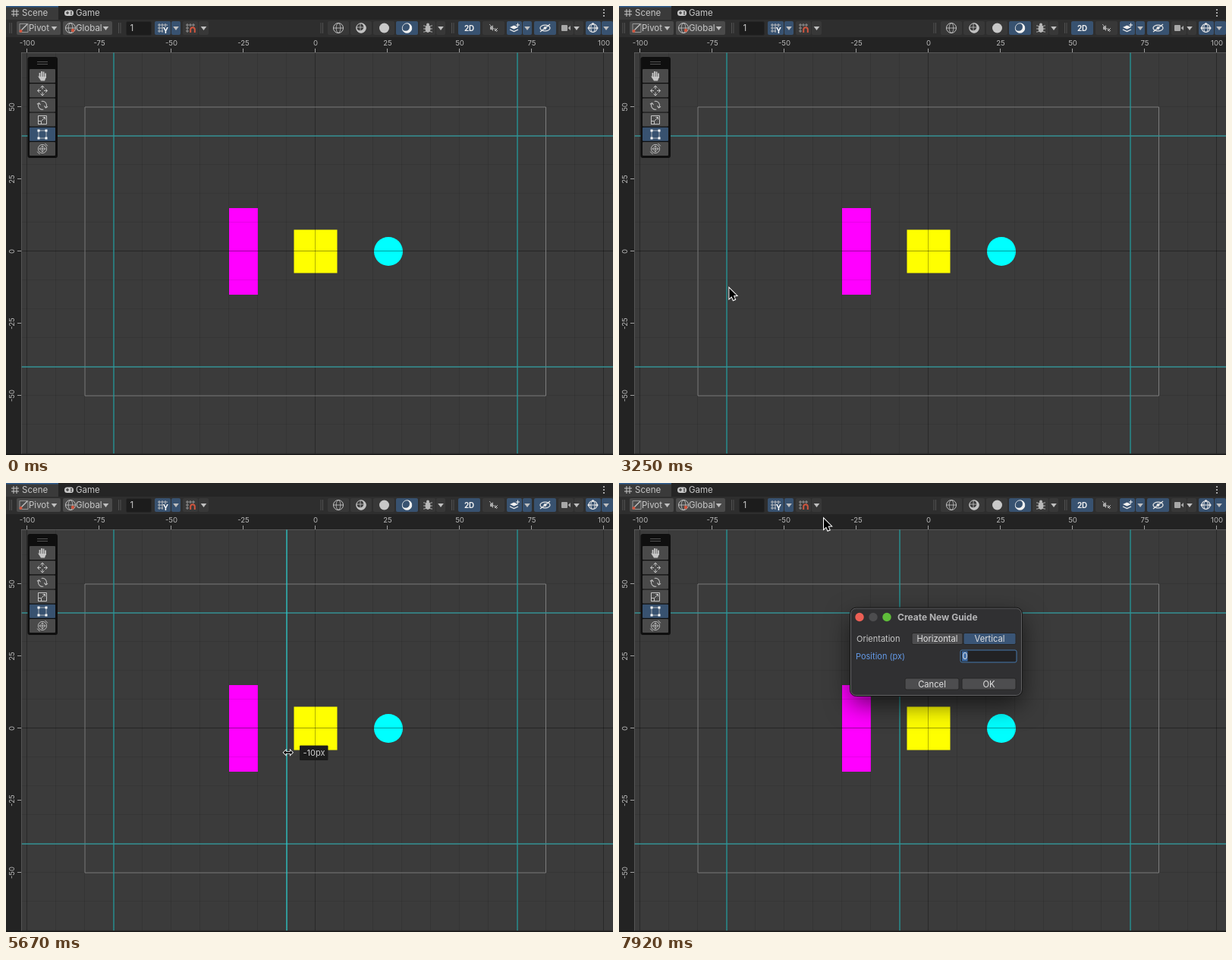
Write an HTML page with a canvas that moves like this. It is 800 by 591 pixels and loops after 8 s.

```html
<!DOCTYPE html>
<html lang="en">
<head>
<meta charset="utf-8">
<title>Scene guides</title>
<style>
html, body { margin: 0; width: 100%; height: 100%; overflow: hidden; background: #232323; }
canvas { display: block; width: 800px; height: 591px; }
</style>
</head>
<body>
<canvas id="stage" width="800" height="591"></canvas>
<script>
const c = document.getElementById('stage').getContext('2d');
const LOOP = 8000, FPS = 12, UNIT = 3.8, OX = 408, OY = 323;
const ICON = '#c6c6c6', BLUE = '#385270', GRAY = '#4a4a4a', DARK = '#383838';
const px = u => OX + u * UNIT, py = u => OY - u * UNIT;
const crisp = v => Math.floor(v - .5) + .5;

function box(x, y, w, h, fill, r = 0, stroke) {
  c.beginPath();
  c.roundRect(x, y, w, h, r);
  if (fill) { c.fillStyle = fill; c.fill(); }
  if (stroke) { c.strokeStyle = stroke; c.lineWidth = 1; c.stroke(); }
}
function line(points, color = ICON, width = 1, close = false) {
  c.beginPath();
  for (let i = 0; i < points.length; i += 2) c.lineTo(points[i], points[i + 1]);
  if (close) c.closePath();
  c.strokeStyle = color; c.lineWidth = width; c.stroke();
}
function poly(points, fill = ICON) {
  c.beginPath();
  for (let i = 0; i < points.length; i += 2) c.lineTo(points[i], points[i + 1]);
  c.closePath(); c.fillStyle = fill; c.fill();
}
function oval(x, y, rx, ry, fill, stroke, width = 1) {
  c.beginPath(); c.ellipse(x, y, rx, ry, 0, 0, Math.PI * 2);
  if (fill) { c.fillStyle = fill; c.fill(); }
  if (stroke) { c.strokeStyle = stroke; c.lineWidth = width; c.stroke(); }
}
const dot = (x, y, r, fill) => oval(x, y, r, r, fill);
const ring = (x, y, r, color = ICON, width = 1) => oval(x, y, r, r, null, color, width);
function arc(x, y, r, from, to, color = ICON, width = 1) {
  c.beginPath(); c.arc(x, y, r, from, to);
  c.strokeStyle = color; c.lineWidth = width; c.stroke();
}
function text(s, x, y, size = 11.5, color = '#c8c8c8', align = 'left', weight = 400) {
  c.font = `${weight} ${size}px Inter, sans-serif`;
  c.textAlign = align; c.fillStyle = color; c.fillText(s, x, y);
}
const caret = x => poly([x - 3.8, 27, x + 3.8, 27, x, 32], '#c0c0c0');
function at(x, y, draw, angle = 0) {
  c.save(); c.translate(x, y); c.rotate(angle); draw(); c.restore();
}
function fourWays(x, y, draw) {
  for (let i = 0; i < 4; i++) at(x, y, draw, i * Math.PI / 2);
}
function globe(x, y) {
  ring(x, y, 6.5);
  oval(x, y, 2.8, 6.5, null, ICON, .8);
  line([x - 6.5, y, x + 6.5, y], ICON, .8);
}
function grip(x) {
  for (const gx of [x, x + 2.5]) line([gx, 22, gx, 36], '#505050');
}

function guide(u, active = false) {
  line([px(u), 61, px(u), 589], active ? '#2fc4c4' : '#289496', 1.4);
}
function drawScene() {
  box(20, 61, 780, 529, '#3b3b3b');
  c.save();
  c.beginPath(); c.rect(20.5, 61, 780, 528); c.clip();
  box(px(-30), py(15), 38, 114, '#ff00ff');
  box(px(-7.5), py(7.5), 57, 57, '#ffff00');
  dot(504, OY, 19, '#00ffff');
  for (let u = -100; u <= 100; u += 10) {
    const shade = u % 100 ? 'rgba(0,0,0,.09)' : 'rgba(0,0,0,.3)';
    const x = crisp(px(u)), y = crisp(py(u));
    line([x, 61, x, 590], shade);
    line([20, y, 800, y], u ? shade : 'rgba(0,0,0,.38)');
  }
  box(104, 133, 607.5, 380, null, 0, '#7d7d7d');
  for (const u of [-70, 70]) guide(u);
  for (const u of [40, -40]) line([20, py(u), 800, py(u)], '#349294', 1.4);
  c.restore();
}

function drawRulers() {
  box(0, 41, 800, 20, '#232323');
  box(0, 41, 20, 550, '#232323');
  line([20, 61.5, 800, 61.5], '#6a6a6a', .6);
  line([20.5, 61, 20.5, 590], '#6a6a6a', .6);
  box(0, 589.5, 800, 1.5, '#181818');
  for (let u = -100; u <= 100; u += 25) {
    const x = px(u), y = py(u);
    text(u, x, 52.3, 9.6, '#b8b8b8', 'center');
    line([crisp(x), 56, crisp(x), 61], '#a0a0a0');
    if (Math.abs(u) > 50) continue;
    at(11.3, y, () => text(u, 0, 0, 9.6, '#b8b8b8', 'center'), -Math.PI / 2);
    line([15, crisp(y), 20, crisp(y)], '#a0a0a0');
  }
}

function drawTabs() {
  box(0, 0, 800, 18, '#252525');
  box(0, 0, 69, 18, '#3a3a3a');
  box(0, 0, 69, 1.5, '#2f5d8f');
  for (const d of [-2, 2]) {
    line([12 + d, 4, 12 + d, 14]);
    line([7, 9 + d, 17, 9 + d]);
  }
  text('Scene', 21, 13.2);
  box(77, 5.5, 12, 7.5, ICON, 3.5);
  line([79, 9, 83, 9], '#252525'); line([81, 7, 81, 11], '#252525');
  dot(86, 8, .9, '#252525'); dot(86, 10.5, .9, '#252525');
  text('Game', 92, 13.2);
  for (const y of [5, 9, 13]) dot(788, y, 1.1, ICON);
}

function drawToolbar() {
  box(0, 18, 800, 23, '#2e2e2e');
  [5, 148.5, 415, 587.5].forEach(grip);
  const buttons = [
    [14, 58, GRAY], [75, 65, GRAY], [196, 21, BLUE], [218, 12, BLUE],
    [233, 20, DARK], [254, 13, DARK], [424, 28, DARK], [454, 28, DARK],
    [484, 28, DARK], [514, 29, BLUE], [545, 21, DARK], [567, 12, DARK],
    [596, 29, BLUE], [628, 29, DARK], [660, 20, BLUE], [681, 12, BLUE],
    [696, 29, BLUE], [728, 20, DARK], [749, 12, DARK], [764, 20, BLUE], [785, 15, BLUE]
  ];
  for (const [x, w, fill] of buttons) box(x, 20, w, 18, fill, 2);
  [63.5, 131.5, 224, 260.5, 573, 687, 752, 791].forEach(caret);

  box(18, 23.5, 11, 11, null, 0, '#989898');
  line([19, 33, 28, 24], ICON, 1.2);
  dot(19.5, 33, 2, '#d0563f');
  text('Pivot', 30, 33.2);
  globe(85, 29); dot(88, 32, 2.2, '#d0563f');
  text('Global', 92, 33.2);
  box(158.5, 20.5, 33, 18, '#1c1c1c', 2, '#262626');
  text('1', 163.5, 33.2);

  for (const d of [0, 4, 8]) {
    line([200, 25 + d, 213, 25 + d], ICON, .9);
    line([202 + d, 23, 202 + d, 35], ICON, .9);
  }
  box(207, 28, 7, 9, BLUE);
  text('Y', 210.5, 36, 10, '#fff', 'center', 700);
  for (const d of [0, 4, 8]) {
    line([237, 25 + d, 249, 25 + d], '#9a9a9a', .9);
    line([239 + d, 23, 239 + d, 35], '#9a9a9a', .9);
  }
  box(241, 27, 10, 9, DARK);
  arc(246, 31, 2.8, Math.PI, 0, '#d0563f', 2);
  for (const x of [243.2, 248.8]) line([x, 31, x, 35], '#d0563f', 2);

  globe(438, 29);
  dot(468, 29, 6.5, '#c0c0c0'); dot(466.7, 27.7, 4.6, DARK);
  ring(468, 29, 6.2);
  line([462, 28, 471, 28], ICON, .8); line([467, 23, 467, 32], ICON, .8);
  dot(498.5, 29, 6.5, '#c8c8c8');
  dot(528.5, 29, 6.6, '#f0f0f0'); dot(526.7, 27.5, 5.3, BLUE);
  ring(528.5, 29, 6.2, '#f0f0f0', .8);
  oval(556, 30, 3.5, 5, '#b8b8b8'); dot(556, 24.5, 2, '#b8b8b8');
  for (const d of [-3, 0, 3]) line([550, 30 + d * 1.4, 556, 30 + d, 562, 30 + d * 1.4], '#b8b8b8', .9);

  text('2D', 610.5, 32.8, 9.8, '#f0f0f0', 'center', 700);
  poly([638, 27, 640, 27, 642, 25, 642, 33, 640, 31, 638, 31], '#aaa');
  line([637, 24, 647, 34], '#aaa');
  line([644, 29, 648, 33], '#aaa'); line([648, 29, 644, 33], '#aaa');
  poly([664, 28, 669.5, 25.5, 675, 28, 669.5, 30.5], '#f0f0f0');
  line([664, 31, 669.5, 33.5, 675, 31], '#f0f0f0', 1.3);
  line([672, 25, 677, 25], '#f0f0f0'); line([674.5, 22.5, 674.5, 27.5], '#f0f0f0');
  oval(710.5, 29, 6.5, 3.8, null, '#e4e4e4', 1.3); dot(710.5, 29, 2, '#e4e4e4');
  line([704, 34, 717, 24], '#e4e4e4', 1.4);
  box(732, 25, 8, 8, '#a8a8a8', 1); poly([740.5, 29, 744, 26, 744, 32], '#a8a8a8');
  ring(773.5, 29, 5.5, '#e8e8e8', 1.2);
  oval(773.5, 29, 2.7, 5.5, null, '#e8e8e8');
  line([767, 29, 780, 29], '#e8e8e8');
  for (const [x, y] of [[773.5, 23.5], [768, 29], [779, 29]]) dot(x, y, 1.5, '#e8e8e8');
}

function drawPalette() {
  box(28.5, 67, 39.5, 133, '#0f0f0f', 3);
  line([41, 73.5, 55, 73.5], '#666', .8); line([41, 76.5, 55, 76.5], '#666', .8);
  for (let i = 0; i < 6; i++) box(31, 83 + i * 19.2, 34, 18, i === 4 ? BLUE : '#4a4a4a', 1);

  for (const [x, top] of [[44.5, 88], [47, 86], [49.5, 86.5], [52, 88.5]]) line([x, top, x, 95], ICON, 1.8);
  poly([42, 92, 44, 93, 53, 93, 51, 98.5, 46, 98.5]);
  fourWays(48, 111.5, () => {
    line([2, 0, 6, 0]); line([4, -2.4, 6.6, 0, 4, 2.4]);
  });
  for (const a of [0, Math.PI]) at(48, 130.8, () => {
    arc(0, 0, 5.5, -2.7, -.3);
    line([2, -1.6, 5.2, -1.4, 5.6, -4.6]);
  }, a + .9);
  box(42.5, 144.5, 11, 11, null, 0, ICON);
  box(42.5, 151.5, 4, 4, null, 0, ICON);
  line([47, 151, 51.5, 146.5]); line([48.5, 146.5, 51.5, 146.5, 51.5, 149.5]);
  line([43, 164, 53, 164, 53, 174, 43, 174], '#c8c8c8', .8, true);
  for (const x of [43, 53]) for (const y of [164, 174]) box(x - 1.5, y - 1.5, 3, 3, '#fff');
  ring(48, 188, 5.6, ICON, .9);
  fourWays(48, 188, () => {
    line([0, 0, 4, 0], ICON, .9); line([2.4, -1.6, 4, 0, 2.4, 1.6], ICON, .9);
  });
  for (const a of [-.8, 2.34]) arc(48, 188, 7.6, a - .3, a + .3);
}

function drawDialog() {
  c.save();
  c.shadowColor = 'rgba(0,0,0,.6)'; c.shadowBlur = 32; c.shadowOffsetY = 12;
  box(305, 164.5, 226, 115, '#303032', 7);
  c.restore();
  box(305.5, 165, 225, 114.5, '#303032', 7, '#626264');
  box(304.5, 164, 227, 116.5, null, 8, '#161616');
  dot(317, 176.5, 5.7, '#ec5f55');
  dot(335, 176.5, 5.7, '#4c4c4e');
  dot(353, 176.5, 5.7, '#5fbd3a');
  text('Create New Guide', 367, 180.5, 12, '#b4b4b6', 'left', 700);
  text('Orientation', 313, 208.8, 11);
  const button = (label, x, y, w, fill) => {
    box(x, y, w, 15, fill, 2, '#262626');
    text(label, x + w / 2, y + 11.5, 11.2, '#e0e0e0', 'center');
  };
  button('Horizontal', 386, 197.5, 67, '#4d4d4f');
  button('Vertical', 454, 197.5, 69, '#3a5576');
  button('Cancel', 377, 257, 71, '#4d4d4f');
  button('OK', 452, 257, 71, '#4d4d4f');
  text('Position (px)', 312, 231.8, 11, '#6399e6');
  box(450, 220, 74, 16, '#222224', 2, '#4478ac');
  box(452, 221.5, 7.5, 13, '#3c6ba6');
  text('0', 452.5, 232, 11.2, '#e0e0e0');
}

// Cursor waypoints: time, x, y
const path = [
  [830, 400, 612], [1420, 329, 506], [2420, 272, 440], [3080, 180, 384],
  [3910, 11, 323], [4200, 11, 323], [4250, 50, 323], [4830, 358, 356],
  [5000, 371, 358], [5830, 372, 354], [5920, 370, 350], [6250, 322, 238],
  [6500, 320, 232], [6750, 304, 198], [7420, 270, 47], [8000, 270, 47]
];
function cursorAt(t) {
  const i = path.findIndex(p => p[0] > t);
  if (i < 1) return null;
  const [t0, x0, y0] = path[i - 1], [t1, x1, y1] = path[i];
  const k = (t - t0) / (t1 - t0);
  return [x0 + (x1 - x0) * k, y0 + (y1 - y0) * k];
}
function drawArrow() {
  const shape = [0, 0, 0, 13.5, 3.1, 10.7, 5.2, 15.6, 7.6, 14.6, 5.5, 9.8, 9.6, 9.6];
  line(shape, '#fff', 2, true);
  poly(shape, '#000');
}
function drawResize() {
  const shape = [-6, 0, -3, -3, -3, -1, 3, -1, 3, -3, 6, 0, 3, 3, 3, 1, -3, 1, -3, 3];
  line(shape, '#fff', 1.7, true);
  poly(shape, '#000');
}

function render(t) {
  const cursor = cursorAt(t);
  const dragging = t > 4300 && t < 5700;
  drawScene();
  if (dragging) {
    const u = Math.floor((cursor[0] - OX) / UNIT);
    guide(u, true);
    const x = Math.round(cursor[0]) + 15, y = Math.round(cursor[1]) - 9.5;
    box(x, y, 37.5, 19.5, '#1c1c1c', 1);
    text(u + 'px', x + 19, y + 13.7, 11, '#d0d0d0', 'center');
  } else if (t >= 5700) guide(-10);
  drawTabs();
  drawToolbar();
  drawRulers();
  drawPalette();
  if (t >= 7580) drawDialog();
  if (cursor) at(...cursor, t > 3880 && t < 5870 ? drawResize : drawArrow);
}

let shown = -1;
function tick(now) {
  const step = Math.floor(((now % LOOP) + 5) * FPS / 1000) % (LOOP * FPS / 1000);
  if (step !== shown) render(Math.round((shown = step) * 100 / FPS) * 10);
  requestAnimationFrame(tick);
}
tick(performance.now());
</script>
</body>
</html>
```
